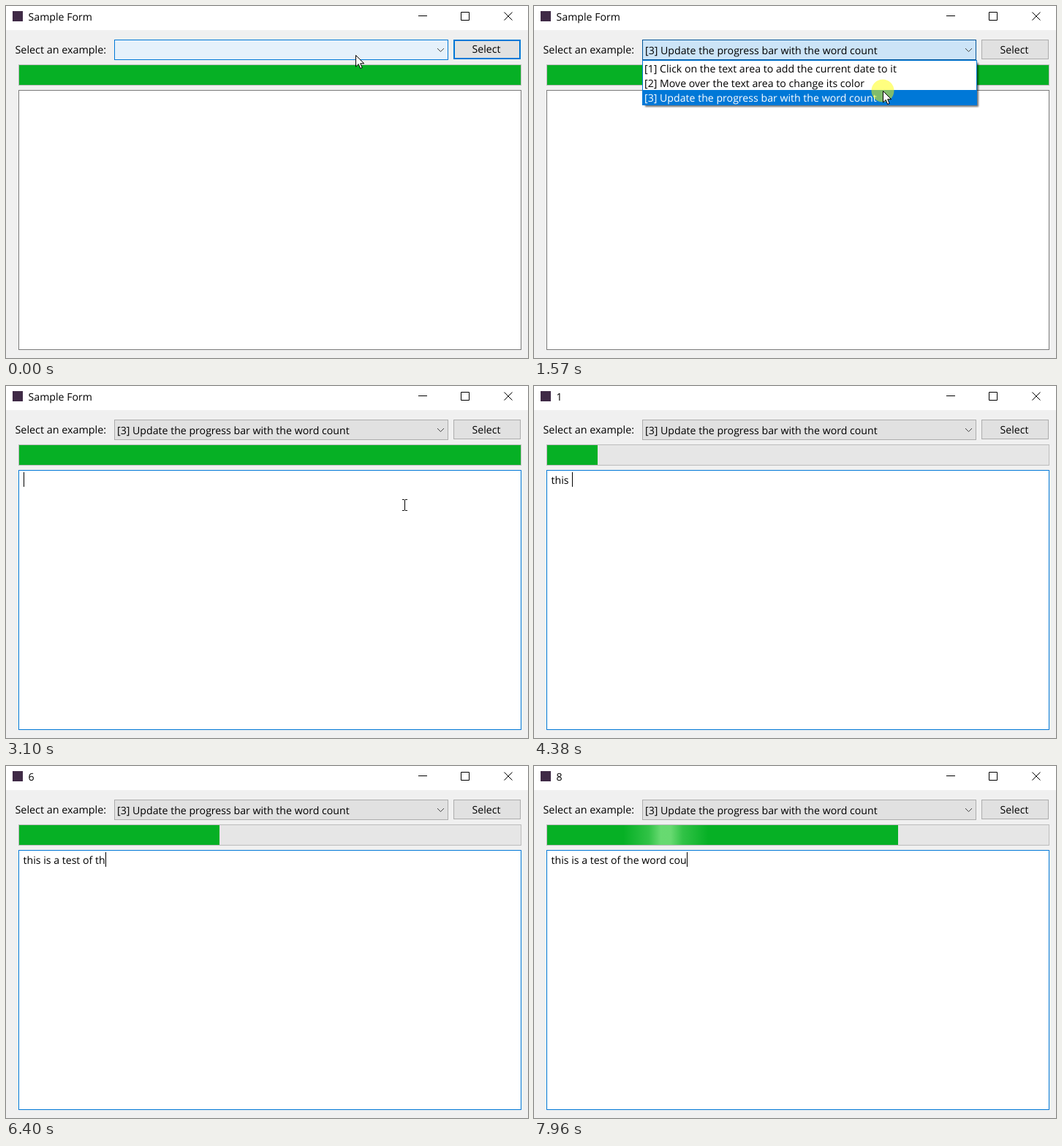
Write an HTML page that moves like this. It is 714x482 px and loops after 8000 ms.

```html
<!DOCTYPE html>
<html lang="en">
<head>
<meta charset="utf-8">
<title>Sample Form</title>
<style>
  html, body { margin: 0; width: 100%; height: 100%; overflow: hidden; background: #f0f0f0; }
  svg { display: block; width: 714px; height: 482px; }
  text { font: 14.15px "Open Sans", "Noto Sans", sans-serif; fill: #000; white-space: pre; text-rendering: geometricPrecision; }
  .line { fill: none; stroke: #000; }
</style>
</head>
<body>
<svg viewBox="0 0 714 482">
  <defs>
    <linearGradient id="glow">
      <stop offset="0" stop-color="#72de79" stop-opacity="0"/>
      <stop offset=".3" stop-color="#72de79" stop-opacity=".4"/>
      <stop offset=".44" stop-color="#72de79" stop-opacity=".9"/>
      <stop offset=".56" stop-color="#72de79" stop-opacity=".9"/>
      <stop offset=".7" stop-color="#72de79" stop-opacity=".4"/>
      <stop offset="1" stop-color="#72de79" stop-opacity="0"/>
    </linearGradient>
    <clipPath id="filled"><rect id="filledArea" x="18" y="81" height="27"/></clipPath>
    <clipPath id="unrolled"><rect id="unrolledArea" x="148" y="74" width="462"/></clipPath>
    <filter id="soft"><feGaussianBlur stdDeviation="1.2"/></filter>
  </defs>

  <rect width="714" height="482" fill="#f0f0f0"/>
  <rect width="714" height="33" fill="#fff"/>
  <rect x="9" y="7" width="14" height="14" fill="#3f2a46"/>
  <text id="title" x="30.5" y="20"/>
  <path class="line" d="M564 13.5h12M622.5 8.5h11v11h-11zM681.5 8.5l11 11M692.5 8.5l-11 11"/>

  <text x="12.5" y="65" style="font-size:14.35px">Select an example:</text>
  <rect id="combo" x="148.5" y="46.5" width="456" height="27"/>
  <text id="choice" x="152" y="66"/>
  <path class="line" d="M590 58l4.5 4.5 4.5-4.5" style="stroke:#444"/>
  <rect id="button"/>
  <text id="buttonText" x="657" text-anchor="middle">Select</text>

  <rect x="17.5" y="80.5" width="687" height="28" fill="#e6e6e6" stroke="#bcbcbc"/>
  <g clip-path="url(#filled)">
    <rect x="18" y="81" width="686" height="27" fill="#06b025"/>
    <rect id="shine" y="81" width="116" height="27" fill="url(#glow)"/>
  </g>

  <rect id="area" x="17.5" y="115.5" width="687" height="355" fill="#fff"/>
  <text id="typed" x="23.5" y="134"/>
  <path id="caret" class="line" d="M0 118v20"/>

  <g id="list" clip-path="url(#unrolled)">
    <rect x="152" y="78" width="456" height="60" fill="#000" opacity=".55" filter="url(#soft)"/>
    <rect x="148.5" y="74.5" width="457" height="61" fill="#fff" stroke="#0078d7"/>
    <rect id="highlight" x="149" width="456" height="20" fill="#0078d7"/>
    <g id="items"></g>
  </g>

  <g id="pointer">
    <circle id="click" r="15.5" fill="#ff0" opacity=".5"/>
    <path id="arrow" d="M.5 .5V16L4.2 12.5L6.7 18.5L9.2 17.4L6.7 11.7H11.7Z" fill="#fff" stroke="#000"/>
    <path id="beam" class="line" d="M-3 -7.5h3M1 -7.5h3M.5 -7V7M-3 7.5h3M1 7.5h3"/>
  </g>
</svg>
<script>
const LOOP = 8000;
const OPTIONS = [
  "[1] Click on the text area to add the current date to it",
  "[2] Move over the text area to change its color",
  "[3] Update the progress bar with the word count"
];
const PHRASE = "this is a test of the word cou";
const KEY_TIMES = [
  3580, 3720, 3930, 4180, 4380, 4520, 4660, 4870, 4940, 5070,
  5210, 5350, 5490, 5630, 5770, 5840, 5990, 6060, 6200, 6400,
  6600, 6740, 6870, 7210, 7350, 7500, 7640, 7700, 7830, 7960
];
// Rows of time, x, y
const POINTER = [[480, 478, 67], [1150, 477, 116], [1640, 477, 116], [2270, 682, 66], [2620, 682, 66], [3020, 545, 163]];
// Rows of time, filled share
const PROGRESS = [[3649, 1], [3650, .1], [4520, .1], [4800, .2], [5280, .2], [5500, .3], [5770, .3],
  [5970, .4], [6600, .4], [7000, .6], [7210, .6], [7450, .7]];
const SHINE_STARTS = [4750, 7240];
const SHINE_SPEED = .25;

const LOOKS = {
  normal: ["#e1e1e1", "#adadad"],
  hover: ["#e5f1fb", "#0078d7"],
  pressed: ["#cce4f7", "#005499"],
  focused: ["#e1e1e1", "#0078d7"]
};

const el = {};
document.querySelectorAll("[id]").forEach(node => el[node.id] = node);

function set(node, attrs) {
  for (const name in attrs) node.setAttribute(name, attrs[name]);
}
const show = (node, on) => set(node, { visibility: on ? "inherit" : "hidden" });
const within = (t, from, to) => t >= from && t < to;
const smooth = p => p * p * (3 - 2 * p);

function setText(node, value) {
  if (node.textContent !== value) node.textContent = value;
}

function track(rows, t, column, ease = p => p) {
  const next = rows.findIndex(row => row[0] > t);
  if (next === 0) return rows[0][column];
  if (next < 0) return rows[rows.length - 1][column];
  const a = rows[next - 1], b = rows[next];
  return a[column] + (b[column] - a[column]) * ease((t - a[0]) / (b[0] - a[0]));
}

function paint(node, look) {
  const [fill, stroke] = LOOKS[look];
  set(node, { fill, stroke });
}

const itemNodes = OPTIONS.map((label, i) => {
  const node = document.createElementNS("http://www.w3.org/2000/svg", "text");
  set(node, { x: 151, y: 91 + i * 20 });
  node.textContent = label;
  el.items.append(node);
  return node;
});

function drawCombo(t, y) {
  paint(el.combo, t < 400 ? "hover" : t < 1640 ? "pressed" : "normal");
  setText(el.choice, t >= 1500 ? OPTIONS[2] : "");
  const open = within(t, 540, 1640);
  show(el.list, open);
  if (!open) return;
  set(el.unrolledArea, { height: 67 * Math.min(1, (t - 470) / 210) });
  const row = y < 75 ? -1 : Math.min(2, Math.floor((y - 75) / 20));
  show(el.highlight, row >= 0);
  set(el.highlight, { y: 75 + row * 20 });
  itemNodes.forEach((node, i) => node.style.fill = i === row ? "#fff" : "#000");
}

function drawButton(t) {
  const look = t < 400 ? "focused"
    : within(t, 2130, 2480) ? "hover"
    : within(t, 2480, 2620) ? "pressed"
    : within(t, 2620, 2900) ? "focused" : "normal";
  paint(el.button, look);
  const thick = look === "focused" ? 2 : 1;
  set(el.button, {
    x: 612 + thick / 2, y: 46 + thick / 2,
    width: 92 - thick, height: 27 - thick, "stroke-width": thick
  });
  set(el.buttonText, { y: look === "normal" ? 65 : 64 });
}

function drawPointer(t, x, y) {
  const beam = y > 115 && t >= 1640;
  show(el.pointer, t < 3580);
  set(el.pointer, { transform: `translate(${Math.round(x)} ${Math.round(y)})` });
  show(el.arrow, !beam);
  show(el.beam, beam);
  show(el.click, [[400, 540], [1500, 1640], [2480, 2620], [2900, 3040]].some(span => within(t, ...span)));
}

function drawProgress(t) {
  set(el.filledArea, { width: Math.round(686 * track(PROGRESS, t, 1)) });
  const start = SHINE_STARTS.filter(s => s <= t).pop();
  show(el.shine, start !== undefined && t < start + 1310);
  if (start !== undefined) set(el.shine, { x: (t - start) * SHINE_SPEED - 58 });
}

function drawTyping(t) {
  const countAt = time => KEY_TIMES.filter(key => key <= time).length;
  const words = PHRASE.slice(0, countAt(t - 70)).split(" ").filter(Boolean).length;
  const text = PHRASE.slice(0, countAt(t));
  setText(el.title, words ? String(words) : "Sample Form");
  setText(el.typed, text);
  show(el.caret, t >= 2900);
  const x = 24 + (text ? Math.round(el.typed.getComputedTextLength()) : 0);
  set(el.caret, { transform: `translate(${x + .5} 0)` });
}

function render(t) {
  const x = track(POINTER, t, 1, smooth);
  const y = track(POINTER, t, 2, smooth);
  drawCombo(t, y);
  drawButton(t);
  drawProgress(t);
  drawTyping(t);
  drawPointer(t, x, y);
  const hovered = y > 115 && t >= 1640;
  set(el.area, {
    stroke: t >= 2900 ? "#0078d7" : hovered ? "#171717" : within(t, 1850, 2480) ? "#646464" : "#7a7a7a"
  });
}

const begin = performance.now();
function tick() {
  render((performance.now() - begin) % LOOP);
  requestAnimationFrame(tick);
}
tick();
</script>
</body>
</html>
```
